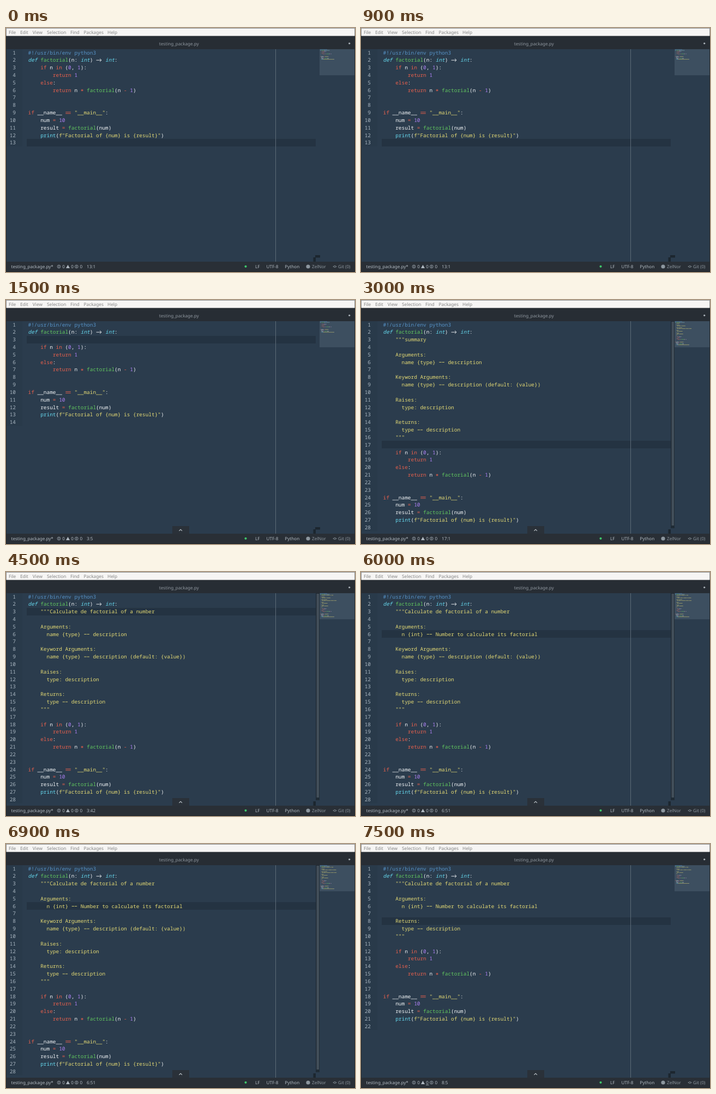
Animation of 640 by 449 pixels, one loop 8000 ms. Source, as an HTML page with a canvas:

```html
<!DOCTYPE html>
<html lang="en">
<head>
<meta charset="utf-8">
<title>Docstring editing</title>
<style>
  html, body { margin: 0; width: 100%; height: 100%; overflow: hidden; background: #2b3c4d; }
  canvas { display: block; width: 640px; height: 449px; }
</style>
</head>
<body>
<canvas id="stage" width="640" height="449"></canvas>
<script>
const ctx = document.getElementById('stage').getContext('2d');
ctx.textRendering = 'geometricPrecision';

const CODE_FONT = '9.45px "Noto Sans Mono", monospace';
const UI_FONT = '8.1px "Noto Sans", sans-serif';
const MENU_FONT = '8.3px "Noto Sans", sans-serif';
const LINE = 13.83, FIRST_CENTER = 45, CODE_X = 40.5;
const TOP = 39, BOTTOM = 430;
const LOOP = 8000, STEP = 1500;
const COLOR = {
  plain: '#f1f4f6', comment: '#5793c7', storage: '#66d9ef', call: '#62c75f',
  keyword: '#e7604d', number: '#ae81f5', string: '#e3d974'
};

const head = ['#!/usr/bin/env python3', 'def factorial(n: int) -> int:'];
const body = [
  '    if n in (0, 1):', '        return 1', '    else:',
  '        return n * factorial(n - 1)', '', '',
  'if __name__ == "__main__":', '    num = 10', '    result = factorial(num)',
  '    print(f"Factorial of {num} is {result}")', ''
];
const summary = '    """Calculate de factorial of a number';
const argument = '      n {int} -- Number to calculate its factorial';
const returns = ['    Returns:', '      type -- description', '    """', ''];
const template = (title, arg) => [
  title, '', '    Arguments:', arg, '',
  '    Keyword Arguments:', '      name {type} -- description (default: {value})', '',
  '    Raises:', '      type: description', '', ...returns
];
const blankArg = '      name {type} -- description';

const scene = (inserted, line, column, extra = {}) =>
  ({ lines: [...head, ...inserted, ...body].reduce(tokenizeLine, { rows: [], inDoc: false }).rows,
     line, column, panel: true, ...extra });

const scenes = [
  scene([], 13, 1, { panel: false }),
  scene([''], 3, 5),
  scene(template('    """summary', blankArg), 17, 1, { scroll: true }),
  scene(template(summary, blankArg), 3, 42, { scroll: true }),
  scene(template(summary, argument), 6, 51, { scroll: true }),
  scene([summary, '', '    Arguments:', argument, '', ...returns], 8, 5, { underline: true })
];

function tokenColor(token) {
  if (token[0] === '#') return COLOR.comment;
  if (/^f?"/.test(token)) return COLOR.string;
  if (/^(def|int|print)$/.test(token)) return COLOR.storage;
  if (/^(if|in|else|return|==|[=*-])$/.test(token)) return COLOR.keyword;
  if (token === 'factorial') return COLOR.call;
  return /^\d/.test(token) ? COLOR.number : COLOR.plain;
}

function tokenizeLine(state, source) {
  const fence = source.includes('"""');
  const doc = state.inDoc || fence;
  const pattern = doc ? /--|(?:(?!--|\s).)+/g : /#.*|f?"[^"]*"|->|==|\w+|[^\s\w]/g;
  state.rows.push([...source.matchAll(pattern)].map(({ 0: text, index }) => ({
    text, column: index,
    color: doc ? COLOR.string : tokenColor(text),
    italic: !doc && /^(def|int)$/.test(text)
  })));
  if (fence) state.inDoc = !state.inDoc;
  return state;
}

function rect(x, y, w, h, color) {
  ctx.fillStyle = color;
  ctx.fillRect(x, y, w, h);
}

function text(value, x, y, font, color, align = 'left') {
  ctx.font = font;
  ctx.fillStyle = color;
  ctx.textAlign = align;
  ctx.fillText(value, x, y);
}

function path(points, color, width = 0.9) {
  ctx.beginPath();
  points.forEach(([x, y]) => ctx.lineTo(x, y));
  ctx.strokeStyle = color;
  ctx.lineWidth = width;
  ctx.stroke();
}

function circle(x, y, r, color, outline = false) {
  ctx.beginPath();
  ctx.arc(x, y, r, 0, Math.PI * 2);
  ctx.lineWidth = 0.8;
  ctx.fillStyle = ctx.strokeStyle = color;
  outline ? ctx.stroke() : ctx.fill();
}

function triangle(points, color) {
  ctx.beginPath();
  points.forEach(([x, y]) => ctx.lineTo(x, y));
  ctx.fillStyle = color;
  ctx.fill();
}

// Operators with their own shapes: joined pairs and a centred asterisk.
const operators = {
  '->'(x, y, color) {
    path([[x + 0.5, y], [x + 9.8, y]], color);
    path([[x + 7, y - 2.7], [x + 9.9, y], [x + 7, y + 2.7]], color);
  },
  '=='(x, y, color) {
    for (const dy of [-1.2, 1.4]) path([[x + 0.8, y + dy], [x + 10.3, y + dy]], color);
  },
  '--'(x, y, color) {
    for (const dx of [0.9, 6.1]) path([[x + dx, y], [x + dx + 4.3, y]], color);
  },
  '*'(x, y, color) {
    for (const angle of [0, 1, 2].map(k => k * Math.PI / 3)) {
      const dx = 2.2 * Math.cos(angle), dy = 2.2 * Math.sin(angle);
      path([[x + 2.8 - dx, y - dy], [x + 2.8 + dx, y + dy]], color, 0.8);
    }
  }
};

function drawCode({ lines, line }) {
  ctx.font = CODE_FONT;
  const advance = ctx.measureText('0').width;
  const bottom = Math.min(BOTTOM, FIRST_CENTER + (lines.length - 0.5) * LINE);
  rect(1, TOP, 29, bottom - TOP, '#293a4a');
  rect(38, Math.round(FIRST_CENTER + (line - 1.5) * LINE), 530, 14, '#243342');
  lines.forEach((tokens, row) => {
    const center = FIRST_CENTER + row * LINE;
    const baseline = center + 3.5;
    text(row + 1, 18, baseline, CODE_FONT, '#a9b6c1', 'right');
    for (const token of tokens) {
      const x = CODE_X + token.column * advance;
      const operator = operators[token.text];
      if (operator) operator(x, center + 0.4, token.color);
      else text(token.text, x, baseline, (token.italic ? 'italic ' : '') + CODE_FONT, token.color);
    }
  });
}

function drawMinimap({ lines }) {
  rect(575, TOP, 64, 48, '#3d4f60');
  ctx.globalAlpha = 0.55;
  lines.forEach((tokens, row) => {
    for (const { text: word, column, color } of tokens)
      rect(576 + column * 0.59, TOP + row * 1.65, word.length * 0.59, 0.9, color);
  });
  ctx.globalAlpha = 1;
}

function drawInfoIcon(x) {
  circle(x, 439, 2.9, '#a3adb6', true);
  path([[x, 437.2], [x, 440.8]], '#a3adb6', 1);
}

function drawStatus({ line, column, underline }) {
  const bright = '#b0b9c1', dim = '#8d979f', y = 441.7;
  const label = (value, x, color = bright) => text(value, x, y, UI_FONT, color);
  rect(1, BOTTOM, 638, 18, '#292f36');
  label('testing_package.py*', 9.5);
  drawInfoIcon(97);
  triangle([[113.5, 435.8], [117, 442], [110, 442]], bright);
  drawInfoIcon(129.3);
  for (const x of [103.3, 119.3, 135.5]) label('0', x);
  if (underline) rect(119, 443, 5.5, 0.8, bright);
  label(`${line}:${column}`, 148);
  circle(439.5, 438.8, 2.1, '#3fc56b');
  label('LF', 457);
  label('UTF-8', 477.5);
  label('Python', 511.3);
  circle(554, 439, 3.6, dim);
  label('ZelNor', 561, dim);
  circle(603, 439, 1.7, dim, true);
  path([[599.5, 439], [601.3, 439]], dim);
  path([[604.7, 439], [606.5, 439]], dim);
  label('Git (0)', 609, dim);
}

function drawFrame() {
  rect(0, 0, 640, 449, '#1d2329');
  rect(0, 0, 640, 14.5, '#8b8d8f');
  rect(1, 1, 638, 13.5, '#f6f5f4');
  const menu = { File: 5, Edit: 26, View: 48.8, Selection: 75, Find: 118, Packages: 142.5, Help: 186 };
  for (const [name, x] of Object.entries(menu)) text(name, x, 11, MENU_FONT, '#858585');
  rect(1, 15, 638, TOP - 15, '#272d34');
  text('testing_package.py', 317.3, 31.7, UI_FONT, '#8f979f', 'center');
  circle(629.7, 28.3, 1.6, '#aab1b8');
  rect(1, TOP, 638, BOTTOM - TOP, '#2b3c4d');
}

function draw(current) {
  drawFrame();
  drawCode(current);
  rect(494, TOP, 1, BOTTOM - TOP, '#5d6b77');
  drawMinimap(current);
  rect(563.5, 422, 4.5, 8, '#1c262f');
  if (current.scroll) {
    rect(568, TOP, 7, 381, '#202b35');
    rect(569.5, TOP + 1, 4.5, 375, '#434f5a');
  } else {
    rect(567, 418, 9, 4.5, '#1c262f');
  }
  if (current.panel) {
    rect(305, 416, 31, 14, '#2a3139');
    path([[317.5, 424.9], [320.2, 422.2], [322.9, 424.9]], '#cdd3d8', 1.1);
  }
  drawStatus(current);
}

function tick() {
  draw(scenes[Math.floor(((performance.now() - start) % LOOP) / STEP)]);
  requestAnimationFrame(tick);
}
const start = performance.now();
tick();
</script>
</body>
</html>
```
